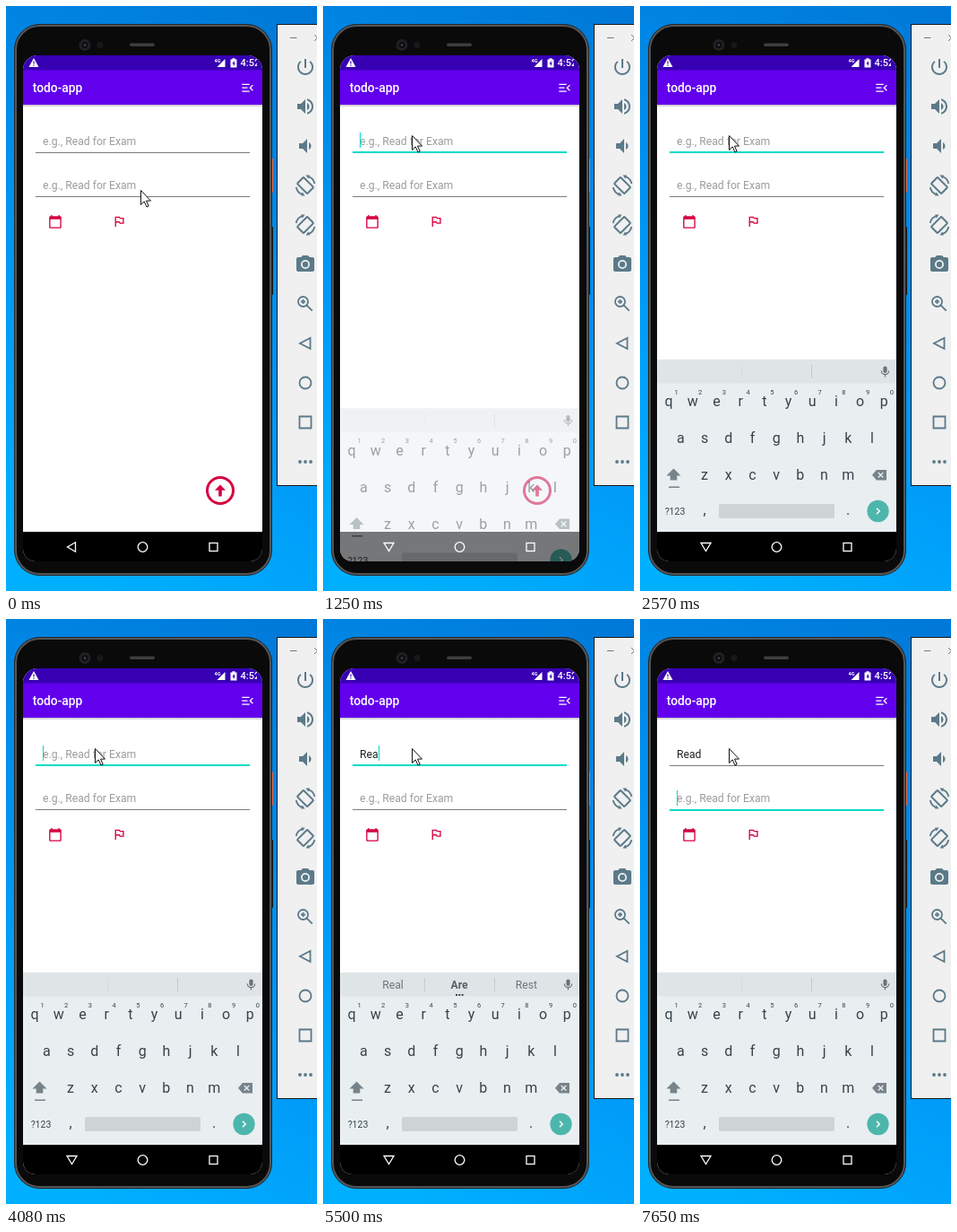
Write an HTML page that moves like this. It is 347 px wide and 652 px high and loops after 8000 ms.

```html
<!DOCTYPE html>
<html lang="en">
<head>
<meta charset="utf-8">
<title>todo-app</title>
<style>
html, body { margin: 0; width: 100%; height: 100%; overflow: hidden; background: #0095f0; }
svg { display: block; width: 347px; height: 652px; font-family: Roboto, sans-serif; }
.mid { text-anchor: middle; }
.line { fill: none; stroke: currentColor; }
.red { fill: #d5003f; }
.tool { fill: #5b7a89; color: #5b7a89; }
.hint { fill: #9c9c9c; }
.field { font-size: 12.2px; }
</style>
</head>
<body>
<svg viewBox="0 0 347 652" xmlns="http://www.w3.org/2000/svg">
  <defs>
    <linearGradient id="sky" gradientUnits="userSpaceOnUse" x1="347" y1="0" x2="0" y2="600">
      <stop offset="0" stop-color="#0078d7"/>
      <stop offset=".4" stop-color="#008cea"/>
      <stop offset=".7" stop-color="#009df8"/>
      <stop offset="1" stop-color="#00b0ff"/>
    </linearGradient>
    <linearGradient id="shade" x1="0" y1="0" x2="0" y2="1">
      <stop offset="0" stop-color="#000" stop-opacity=".25"/>
      <stop offset="1" stop-color="#000" stop-opacity="0"/>
    </linearGradient>
    <clipPath id="screen"><path d="M19 71a16 16 0 0 1 16-16H270a16 16 0 0 1 16 16V605a14 14 0 0 1-14 14H33a14 14 0 0 1-14-14z"/></clipPath>
    <clipPath id="clock"><rect x="255" y="55" width="25" height="16"/></clipPath>
    <clipPath id="keyArea"><rect id="keyBounds" x="19" y="390" width="267" height="196"/></clipPath>
  </defs>

  <rect width="347" height="652" fill="url(#sky)"/>

  <!-- phone body -->
  <rect x="294" y="170" width="4" height="38" rx="1" fill="#e8715a"/>
  <rect x="294" y="246" width="4" height="76" rx="1" fill="#151515"/>
  <rect x="9.5" y="20.5" width="287" height="614" rx="28" fill="#0a0a0a" stroke="#262728"/>
  <rect x="11" y="22" width="284" height="611" rx="26.5" fill="#0a0a0b" stroke="#545658" stroke-width="2"/>
  <circle cx="88" cy="43.5" r="6.5" fill="#202123"/>
  <circle cx="88" cy="43.5" r="3.5" fill="#0d0e12"/>
  <circle cx="88" cy="43.5" r="1.2" fill="#474a55"/>
  <circle cx="105" cy="43.5" r="3.5" fill="#17181a"/>
  <rect x="138" y="41.5" width="28" height="3.5" rx="1.7" fill="#3c3d3e"/>

  <g clip-path="url(#screen)">
    <rect x="19" y="55" width="267" height="564" fill="#fff"/>
    <rect x="19" y="55" width="267" height="17" fill="#3700b3"/>
    <rect x="19" y="71.5" width="267" height="38.5" fill="#6200ee"/>
    <rect x="19" y="110" width="267" height="3" fill="url(#shade)"/>

    <!-- status bar -->
    <path d="M31 58l5.5 10h-11z" fill="#fff"/>
    <path d="M31 61.5v3M31 65.5v1.2" stroke="#3700b3" stroke-width="1.2"/>
    <text x="232.5" y="63" font-size="5.5" font-weight="700" fill="#fff">4G</text>
    <path d="M244.5 59v9h-9z" fill="#fff"/>
    <path d="M250.5 59.5h2V58.3h3v1.2h2V68.5h-7z" fill="#fff"/>
    <path d="M254.8 60.8l-2.4 3.6h1.4v2.8l2.1-3.6h-1.3z" fill="#3700b3"/>
    <text x="261.500" y="67.300" font-size="11" font-weight="500" fill="#fff" clip-path="url(#clock)">4:52</text>

    <!-- app bar -->
    <text x="29.800" y="96.200" font-size="13.800" font-weight="500" fill="#fff">todo-app</text>
    <path class="line" color="#fff" stroke-width="1.3" d="M263.3 87.3h8.4M263.3 91.2h6.2M263.3 95.1h8.4M275.4 88.1l-3.1 3.1 3.1 3.1"/>

    <!-- form -->
    <g class="field">
      <text id="entry" x="41" y="155"></text>
      <text class="hint" x="41" y="204">e.g., Read for Exam</text>
    </g>
    <rect id="compose" x="41" y="156" height="1" fill="#222"/>
    <rect id="rule1" x="33" width="239"/>
    <rect id="rule2" x="33" width="239"/>
    <rect id="caret" width="1" height="17" fill="#03dac5"/>
    <path class="red" transform="translate(46.800 232.200) scale(.68)" d="M20 3h-1V1h-2v2H7V1H5v2H4c-1.1 0-2 .9-2 2v16c0 1.1.9 2 2 2h16c1.1 0 2-.9 2-2V5c0-1.1-.9-2-2-2zm0 18H4V8h16v13z"/>
    <path class="red" transform="translate(118.2 232) scale(.67)" d="M14 6l-1-2H5v17h2v-7h5l1 2h7V6h-6zm4 8h-4l-1-2H7V6h5l1 2h5v6z"/>
    <circle class="line" color="#d5003f" cx="239" cy="540" r="14.5" stroke-width="3"/>
    <path class="red" d="M239 533.5l6 6.2h-4.2v6.8h-3.6v-6.8h-4.2z"/>

    <rect x="19" y="586" width="267" height="33"/>

    <g clip-path="url(#keyArea)">
      <g id="keyboard">
        <rect x="19" y="394" width="267" height="230" fill="#e9eef1"/>
        <rect x="19" y="394" width="267" height="26.5" fill="#dfe4e7"/>
        <rect id="divider" x="113" y="400" width="1" height="15" fill="#c4cacd"/>
        <rect x="191" y="400" width="1" height="15" fill="#c4cacd"/>
        <g class="mid" font-size="12.2" fill="#6b757b">
          <text class="word" x="78" y="412"></text>
          <text class="word" x="152" y="412" font-weight="700" fill="#566067"></text>
          <text class="word" x="227" y="412"></text>
        </g>
        <path id="dots" fill="#3f474b" d="M148 418h2v2h-2zM151.3 418h2v2h-2zM154.6 418h2v2h-2z"/>
        <g fill="#68747b">
          <rect x="271.4" y="401.5" width="4.2" height="7.6" rx="2.1"/>
          <path class="line" color="#68747b" stroke-width="1.2" d="M269.3 406.5a4.2 4.2 0 0 0 8.4 0M273.5 410.7v2.8"/>
        </g>
        <g id="keys" class="mid" fill="#37434a"></g>
        <g fill="#77838a">
          <path d="M37.5 515.5l8 8h-4.2v5h-7.6v-5h-4.2z"/>
          <rect x="32" y="535.5" width="12" height="1.5"/>
          <path d="M264 517h11v11.5h-11l-5-5.75z"/>
        </g>
        <path class="line" color="#e9eef1" stroke-width="1.3" d="M265.8 520l5.5 5.5M271.3 520l-5.5 5.5"/>
        <rect x="88" y="555" width="129" height="16" rx="2" fill="#ced3d6"/>
        <circle cx="265.5" cy="563" r="12.2" fill="#4db6ac"/>
        <path class="line" color="#fff" stroke-width="1.4" d="M264 559.8l3.2 3.2-3.2 3.2"/>
      </g>
    </g>

    <!-- navigation -->
    <g class="line" color="#fff" stroke-width="1.3">
      <path id="back"/>
      <circle cx="152.5" cy="603" r="5.3"/>
      <rect x="227" y="598.5" width="9" height="9"/>
    </g>
  </g>

  <!-- emulator toolbar -->
  <rect x="302.5" y="20.5" width="60" height="514" fill="#f0f0f0" stroke="#151515"/>
  <path class="line" color="#777" d="M317 35.5h7.5M344 32l7 7M344 39l7-7"/>
  <g id="tools" class="tool"></g>

  <path id="pointer" d="M.5.5V16.5l3.7-3.6 2.8 6.1 2.2-1-2.7-5.9h5z" fill="#fff" stroke="#111"/>
</svg>
<script>
const $ = id => document.getElementById(id);
const LOOP = 8000;
const TEAL = "#03dac5", GRAY = "#7c7c7c";

const rows = [["qwertyuiop", 32, 446], ["asdfghjkl", 45.4, 487], ["zxcvbnm", 72, 528]];
const pitch = 26.7;
const label = (x, y, size, text) => `<text x="${x}" y="${y}" font-size="${size}">${text}</text>`;
$("keys").innerHTML = rows.map(([letters, x, y], row) => [...letters].map((letter, i) =>
  label(x + i * pitch, y, 16, letter) +
  (row ? "" : label(x + 8.5 + i * pitch, 432.5, 7.5, (i + 1) % 10))).join("")).join("") +
  label(39, 567, 10.5, "?123") + label(72, 567, 16, ",") + label(232, 567, 16, ".");

const fill = d => `<path d="${d}"/>`;
const line = d => `<path class="line" stroke-width="1.8" d="${d}"/>`;
const rotate = '<rect class="line" stroke-width="2" x="7" y="4" width="10" height="16" rx="1" transform="rotate(-45 12 12)"/>' +
  line("M14.5 1.8A10.500 10.500 0 0 1 22.300 10M9.500 22.200A10.500 10.500 0 0 1 1.700 14") +
  fill("M12.500 .5l4.500 0-1.800 4zM11.500 23.500l-4.500 0 1.800-4z");
const icons = [
  fill("M13 3h-2v10h2V3zm4.83 2.17l-1.42 1.42C17.99 7.86 19 9.81 19 12c0 3.87-3.13 7-7 7s-7-3.13-7-7c0-2.19 1.01-4.14 2.58-5.42L6.17 5.17C4.23 6.82 3 9.26 3 12c0 4.97 4.03 9 9 9s9-4.03 9-9c0-2.74-1.23-5.18-3.17-6.83z"),
  fill("M3 9v6h4l5 5V4L7 9H3zm13.5 3c0-1.77-1.02-3.29-2.5-4.03v8.05c1.48-.73 2.5-2.25 2.5-4.02zM14 3.23v2.06c2.89.86 5 3.54 5 6.71s-2.11 5.85-5 6.71v2.06c4.01-.91 7-4.49 7-8.77s-2.99-7.86-7-8.77z"),
  fill("M18.5 12c0-1.77-1.02-3.29-2.5-4.03v8.05c1.48-.73 2.5-2.25 2.5-4.02zM5 9v6h4l5 5V4L9 9H5z"),
  rotate,
  `<g transform="matrix(-1 0 0 1 24 0)">${rotate}</g>`,
  fill("M9 2 7.17 4H4c-1.1 0-2 .9-2 2v12c0 1.1.9 2 2 2h16c1.1 0 2-.9 2-2V6c0-1.1-.9-2-2-2h-3.17L15 2H9zm3 15a5 5 0 0 1 0-10 5 5 0 0 1 0 10z") + '<circle cx="12" cy="12" r="3.2"/>',
  line("M15 9.5a5.5 5.5 0 1 0-11 0 5.5 5.5 0 0 0 11 0zM13.7 13.7l6 6M9.5 7v5M7 9.5h5"),
  line("M17.5 6v12L6 12z"),
  line("M18.5 12a6.5 6.5 0 1 0-13 0 6.5 6.5 0 0 0 13 0z"),
  line("M5.5 5.5h13v13h-13z"),
  '<circle cx="6" cy="12" r="1.9"/><circle cx="12" cy="12" r="1.9"/><circle cx="18" cy="12" r="1.9"/>'
];
$("tools").innerHTML = icons.map((icon, i) =>
  `<g transform="translate(322 ${56 + i * 44})">${icon}</g>`).join("");

// Each step overrides part of the state from its time on.
const steps = [
  [0, { pointer: [150, 205], text: "", words: [], compose: false, caret: false, focus: 0, drop: 0, alpha: 0 }],
  [120, { pointer: [136, 187] }],
  [240, { pointer: [108, 151] }],
  [360, { pointer: [99, 140] }],
  [510, { pointer: [99, 144] }],
  [810, { focus: 1 }],
  [1100, { caret: true }],
  [1250, { drop: 54.5, alpha: .5 }],
  [1370, { drop: 1, alpha: .95 }],
  [1520, { drop: 0, alpha: 1, caret: false }],
  [2030, { caret: true }],
  [2570, { caret: false }],
  [3130, { caret: true }],
  [3540, { caret: false }],
  [4080, { caret: true }],
  [4490, { caret: false }],
  [4640, { text: "R", caret: true }],
  [4790, { words: ["Re", "R", "Are"], compose: true }],
  [5220, { text: "Re", compose: false }],
  [5370, { words: ["Real", "Are", "Rest"], compose: true }],
  [5500, { text: "Rea", compose: false }],
  [5650, { words: ["Really", "Real", "Reading"], compose: true }],
  [5770, { text: "Read", compose: false }],
  [5920, { words: ["Reading", "Rear", "Ready"], compose: true }],
  [6340, { caret: false }],
  [6650, { focus: 2, caret: true, compose: false }],
  [6770, { words: [] }],
  [7220, { caret: false }],
  [7650, { caret: true }]
];

const set = (id, attrs) => Object.entries(attrs).forEach(([k, v]) => $(id).setAttribute(k, v));
const show = (id, on) => set(id, { visibility: on ? "visible" : "hidden" });
const words = document.querySelectorAll(".word");

function draw(s) {
  const [px, py] = s.pointer;
  set("pointer", { transform: `translate(${px} ${py})` });

  const entry = $("entry");
  entry.textContent = s.text || "e.g., Read for Exam";
  entry.setAttribute("fill", s.text ? "#222" : "#9c9c9c");
  const width = s.text ? entry.getComputedTextLength() : 0;
  set("compose", { width });
  show("compose", s.compose);

  const first = s.focus === 1, second = s.focus === 2;
  set("rule1", first ? { fill: TEAL, y: 162, height: 2 } : { fill: GRAY, y: 163, height: 1 });
  set("rule2", second ? { fill: TEAL, y: 212, height: 2 } : { fill: GRAY, y: 212, height: 1 });
  set("caret", { x: second ? 41 : 41 + Math.round(width), y: second ? 191 : 141 });
  show("caret", s.caret);

  words.forEach((word, i) => word.textContent = s.words[i] || "");
  show("dots", s.words.length);
  set("divider", { opacity: s.words.length ? 1 : .35 });

  set("keyboard", { transform: `translate(0 ${s.drop})`, opacity: s.alpha });
  set("keyBounds", { height: s.drop > 1 ? 229 : 196 + s.drop });
  set("back", { d: s.alpha ? "M68 598.5h11l-5.5 9z" : "M77.5 597.8v10.4l-9-5.2z" });
}

const start = performance.now();
let shown = -1;
function tick() {
  const time = (performance.now() - start) % LOOP;
  const index = steps.filter(([at]) => at <= time).length - 1;
  if (index !== shown) {
    shown = index;
    draw(Object.assign({}, ...steps.slice(0, index + 1).map(([, change]) => change)));
  }
  requestAnimationFrame(tick);
}
tick();
</script>
</body>
</html>
```
